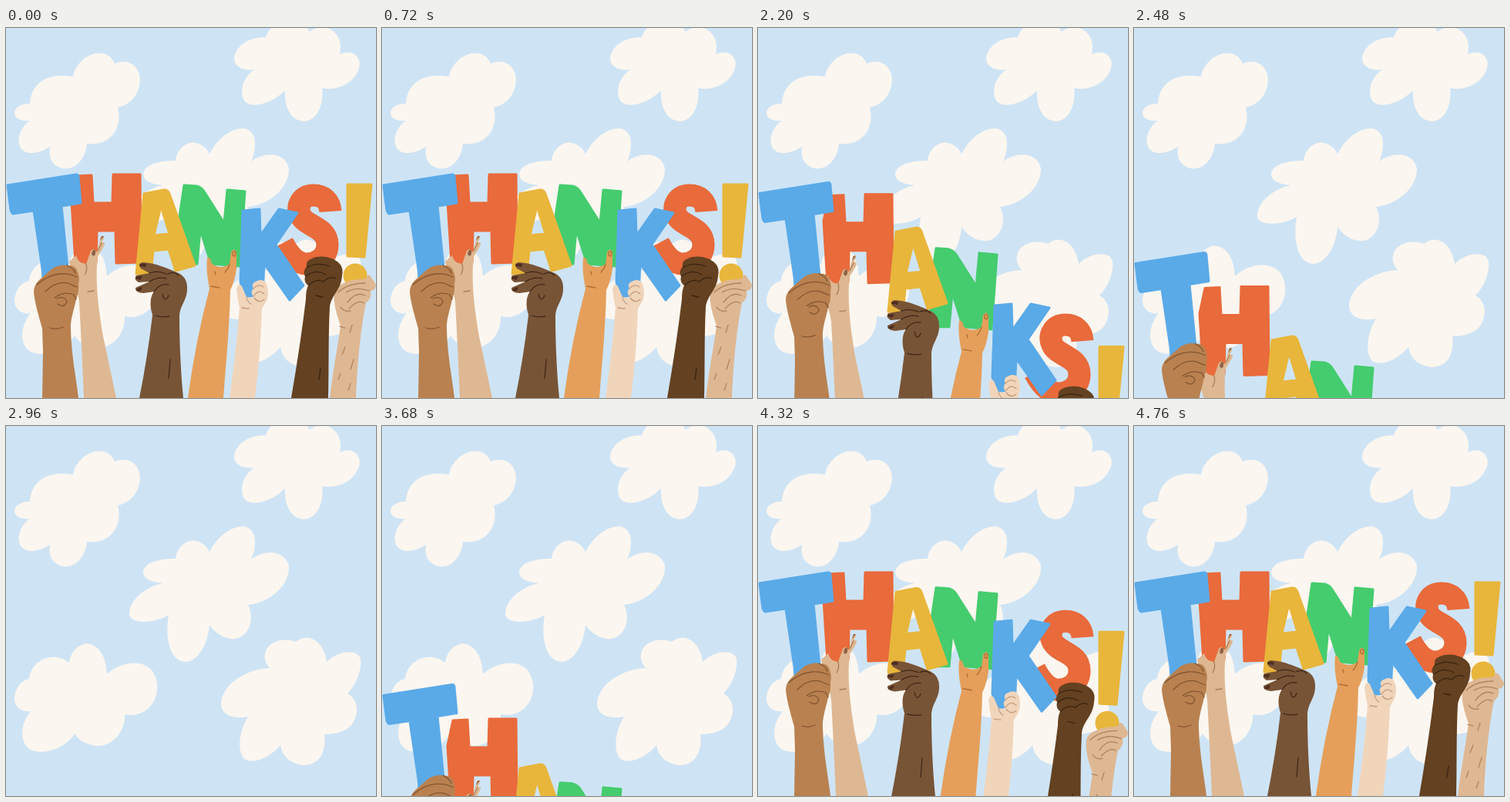
Recreate the animation shown at these times as an HTML page. Size 480 by 480 pixels, loop 4800 ms.

```html
<!DOCTYPE html>
<html lang="en">
<head>
<meta charset="utf-8">
<title>Thanks!</title>
<style>
  html, body { margin: 0; height: 100%; overflow: hidden; background: #cee4f5; }
  svg { display: block; width: 100%; height: 100%; }
  .clouds { fill: #fbf6f0; }
  .letter { stroke-width: 3; stroke-linejoin: round; fill-rule: evenodd; }
  .blue { fill: #5aaae8; stroke: #5aaae8; }
  .red { fill: #e96a3b; stroke: #e96a3b; }
  .yellow { fill: #e8b63b; stroke: #e8b63b; }
  .green { fill: #45cc6e; stroke: #45cc6e; }
  .curve { fill: none; stroke-width: 29; }
  .line { fill: none; stroke-width: 1.3; stroke-linecap: round; stroke-linejoin: round; }
</style>
</head>
<body>
<svg viewBox="0 0 480 480">
  <g class="clouds">
    <path d="M31 98C33 68 58 58 87 63C92 35 130 20 141 46C165 37 178 58 173 75C169 92 158 100 145 103C152 130 135 154 105 150C103 172 88 185 73 182C58 178 55 166 57 154C40 165 20 166 17 150C15 138 22 125 32 120C22 122 11 118 11 110C12 101 22 98 31 98Z"/>
    <path d="M337 12C345 -14 382 -16 394 5C412 -10 440 5 433 34C450 26 462 38 458 52C452 72 430 82 410 78C413 100 403 121 386 121C368 120 361 100 362 81C345 98 318 106 309 94C302 82 308 63 322 54C308 56 296 50 296 40C297 22 318 11 337 12Z"/>
    <path d="M220 172C222 155 236 147 246 149C258 152 263 160 264 164C275 140 300 125 314 132C328 140 323 162 318 173C335 160 362 160 367 182C368 208 340 230 314 232C323 250 316 272 298 276C285 278 270 268 264 258C262 285 248 306 232 306C212 304 206 275 211 245C195 255 165 258 160 246C158 228 180 208 204 204C192 203 178 200 178 189C180 175 205 172 220 172Z"/>
    <path d="M30 328C32 305 60 290 82 307C84 290 98 280 109 283C125 288 130 305 131 322C145 308 175 300 190 318C203 338 195 368 170 374Q160 376 154 374C155 400 135 416 118 415C105 414 94 408 89 399C78 418 45 430 29 418C15 405 22 382 32 370C20 372 10 364 11 352C13 338 20 330 30 328Z"/>
    <path d="M342 314C330 300 336 284 352 279C362 276 372 278 376 280C390 268 412 276 416 306C430 292 455 288 460 302C462 320 452 338 443 347C458 355 458 375 448 388C440 397 425 400 413 400C416 425 405 440 386 440C368 438 358 428 356 414C345 428 322 440 309 432C299 420 303 395 314 377C300 380 280 378 279 361C280 335 310 316 342 314Z"/>
  </g>

  <!-- data-order counts the letters from left to right -->
  <g data-order="6">
    <path class="letter yellow" d="M443 203L474 203L465 297L443 296Z"/>
    <circle cx="453" cy="321" r="15.5" fill="#e8b63b"/>
    <path fill="#deb892" d="M420 480C424 445 431 410 434 386C429 372 424 355 426 343C428 334 436 332 443 329C452 325 461 327 467 325Q468 318 473 322L480 333Q480 340 473 341Q475 350 467 357C461 385 456 430 454 480Z"/>
    <path class="line" stroke="#b08460" d="M431 343Q443 331 466 331M441 343Q455 335 471 341M443 356Q454 341 466 347M445 364Q458 351 464 357M434 362Q439 369 447 367M433 387L440 389M449 385L446 395M440 414L436 424M451 430L447 443M434 448L431 456M447 461L444 470"/>
  </g>
  <g data-order="5">
    <path class="red curve" d="M421 238C420 224 411 217 399 217C384 217 376 230 382 243C389 258 417 258 417 281C417 298 402 306 390 306C377 306 367 294 359 279"/>
    <path fill="#634121" d="M370 480Q382 410 389 352Q389 340 392 334Q386 330 388 322Q384 316 390 310Q388 302 397 299C408 294 425 297 433 306Q438 312 436 321C435 340 422 346 420 362C418 400 419 440 418 480Z"/>
    <path class="line" stroke="#392410" d="M390 311Q403 303 420 309M389 322Q402 312 415 320M393 334Q402 324 412 329M412 329Q420 321 428 325M402 347L411 349M408 441L406 456"/>
  </g>
  <g data-order="3">
    <path class="letter green" d="M231 204L247 205Q253 206 257 212L283 253L287 210L310 212L303 309L266 306L252 262L248 306L225 306L223 258Z"/>
    <path fill="#e59f5b" d="M236 480Q246 405 264 338Q259 315 261 298Q265 296 267 306Q280 314 290 306L292 291Q296 284 299 291L299 312Q297 328 291 340C290 390 285 440 282 480Z"/>
    <path class="line" stroke="#ad6d32" d="M290 306Q288 313 284 317M294 291Q296 288 298 291L297 296L294 295ZM266 335L277 337M271 316L272 320"/>
  </g>
  <g data-order="4">
    <path class="letter blue" d="M307 237L329 235L330 269L354 235L378 240L350 281L386 334L368 353L335 306L333 345L311 349L304 330Z"/>
    <path fill="#f1d5ba" d="M290 480Q298 425 303 363Q300 350 299 338Q302 330 306 335L312 349L322 350Q316 343 321 338Q317 331 326 328Q334 325 338 332Q342 343 338 354L332 364Q330 425 323 480Z"/>
    <path class="line" stroke="#c59e7e" d="M321 338Q328 331 334 336M321 348Q328 338 335 345M322 350Q328 358 335 352M306 363L315 364M312 349Q313 355 318 358"/>
  </g>
  <g data-order="1">
    <path class="letter red" d="M92 192L111 191L113 227L138 227L139 190L174 190L175 304L143 305L142 263L118 263L117 304L90 305L85 225Z"/>
    <path fill="#deb892" d="M117 294L123 271Q128 267 127 273L124 278Q130 277 127 283L118 298ZM101 480Q98 410 95 355C92 335 84 315 82 303L91 295Q93 305 104 306L110 289Q115 284 118 292L118 306C116 340 122 375 126 400L143 480Z"/>
    <path fill="#8f6444" d="M111 294Q112 286 116 288Q117 293 114 296ZM122 276L124 270L127 270Z"/>
    <path class="line" stroke="#a97d57" d="M104 306Q106 314 102 320M119 289L124 279M106 342L114 341"/>
  </g>
  <g data-order="2">
    <path class="letter yellow" d="M179 215L205 210Q210 210 212 215L245 308L220 315L211 287L191 289L188 319L169 319ZM201 231L212 267L192 269Z"/>
    <path fill="#785436" d="M173 480Q184 425 190 372C186 360 187 348 192 342L178 344Q167 343 168 337L186 329L172 330Q165 326 169 321L186 318L175 312Q170 305 178 304C195 305 210 312 224 318Q236 324 235 340C234 355 225 360 225 376C225 410 227 450 230 480Z"/>
    <path class="line" stroke="#402917" d="M186 318Q197 314 208 319M186 329Q197 322 208 325M192 342Q199 331 211 333M210 319Q218 315 224 321M203 345Q206 358 211 347M194 373Q202 376 212 374M213 430L211 455"/>
    <path fill="#4f2d20" d="M173 309Q172 304 182 306L181 310ZM168 325Q168 321 177 322L174 327ZM169 341Q169 337 177 336L175 341Z"/>
  </g>
  <g data-order="0">
    <path class="letter blue" d="M2 204L91 190Q94 190 94 194L97 227L72 231L80 312L78 345L50 345L47 312L36 237L9 241Q7 240 6 236Z"/>
    <path fill="#b98150" d="M47 480L48 420L47 390C42 372 37 355 36 342Q36 334 43 327L60 312Q70 306 80 308Q92 308 93 317Q96 323 94 332Q95 342 91 352C88 367 83 378 84 392C85 425 91 455 94 480Z"/>
    <path class="line" stroke="#83552f" d="M40 333Q55 320 70 319Q82 318 92 323M51 342Q65 328 80 331L92 336M63 350Q75 341 88 346L91 352M66 351Q76 347 79 355Q76 364 67 358M57 389Q65 392 74 388M79 308Q88 312 90 318"/>
  </g>
</svg>
<script>
  const LOOP = 4800, FRAME = 40, TURN = 3120;   // the entrance mirrors the exit around TURN
  const FIRST_EXIT = 1560, STAGGER = 80, DURATION = 1056, DROP = 300;
  const letters = [...document.querySelectorAll('[data-order]')];

  // cubic-bezier(.5, 0, .5, 1)
  function ease(x) {
    if (x <= 0) return 0;
    if (x >= 1) return 1;
    let low = 0, high = 1, s;
    for (let i = 0; i < 20; i++) {
      s = (low + high) / 2;
      if (1.5 * s * (1 - s) + s ** 3 < x) low = s; else high = s;
    }
    return s * s * (3 - 2 * s);
  }

  function draw(now) {
    const time = Math.floor(now % LOOP / FRAME) * FRAME;
    const exitTime = TURN - Math.abs(time - TURN);
    for (const letter of letters) {
      const start = FIRST_EXIT + (6 - letter.dataset.order) * STAGGER;
      const y = DROP * ease((exitTime - start) / DURATION);
      letter.setAttribute('transform', `translate(0 ${y.toFixed(2)})`);
    }
    requestAnimationFrame(draw);
  }
  draw(performance.now());
</script>
</body>
</html>
```
